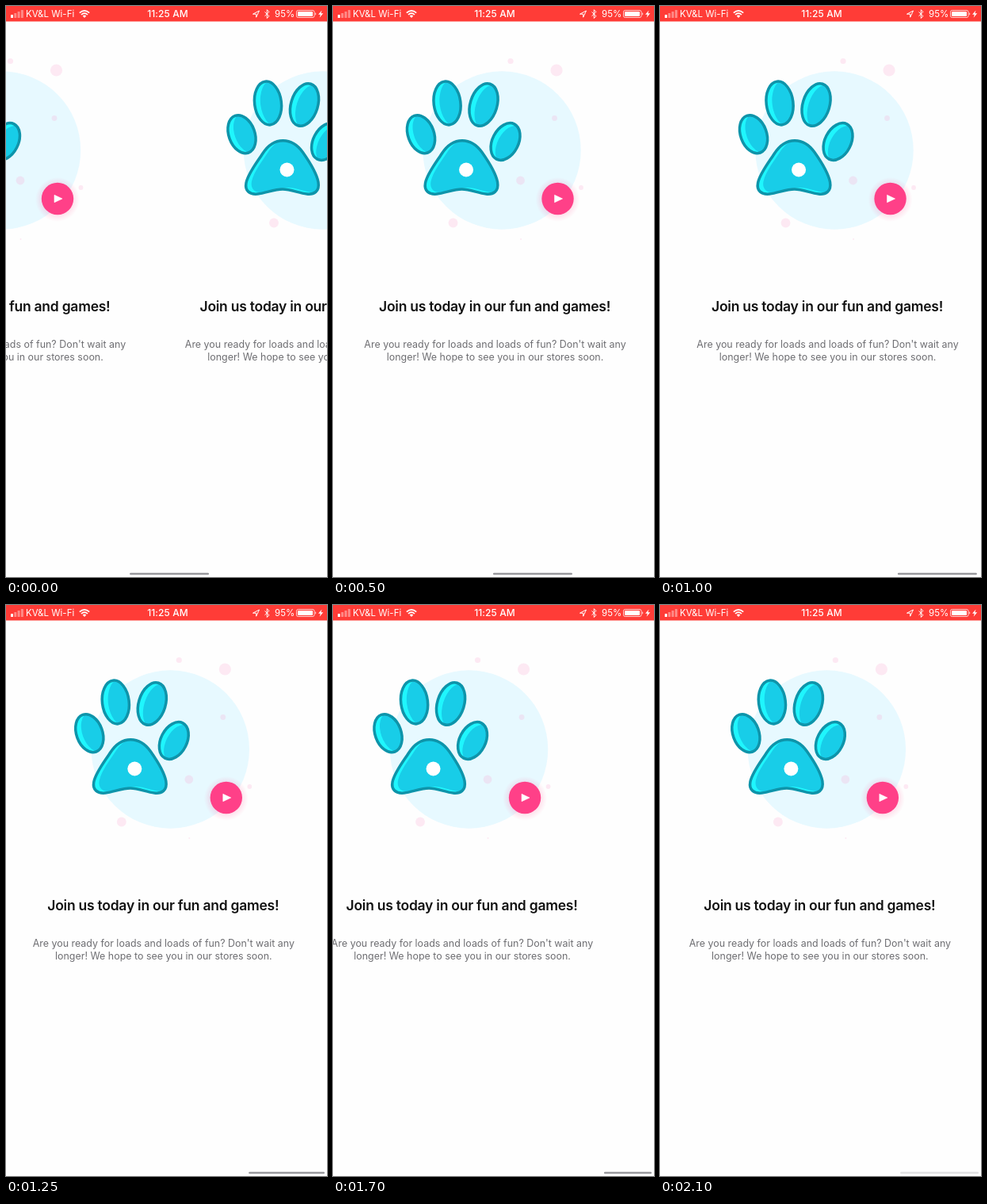
Animation, 405 px wide and 720 px high, one loop 2150 ms. Source, as an HTML page:

```html
<!DOCTYPE html>
<html lang="en">
<head>
<meta charset="utf-8">
<title>Onboarding pager</title>
<style>
  html, body { margin: 0; width: 100%; height: 100%; overflow: hidden; background: #fefefe; }
  svg { display: block; width: 405px; height: 720px; }
  text { font-family: Inter, Roboto, "Liberation Sans", sans-serif; }
  .title { font-size: 17.5px; font-weight: 600; letter-spacing: -.25px; fill: #111; text-anchor: middle; }
  .copy { font-size: 12.45px; fill: #6e6e72; text-anchor: middle; }
  .status { font-size: 11.5px; fill: #fff; }
  .clock { font-size: 12px; font-weight: 500; letter-spacing: .1px; text-anchor: middle; }
  .outline { fill: none; stroke: #0e94aa; stroke-width: 3.5; }
  .shine { fill: #1ff6fd; }
  .skin { fill: #18cde8; }
  .dots { fill: #f9a8cf; fill-opacity: .24; }
</style>
</head>
<body>
<svg viewBox="0 0 405 720">
  <defs>
    <radialGradient id="glow">
      <stop offset=".68" stop-color="#ff4088" stop-opacity=".16"/>
      <stop offset="1" stop-color="#ff4088" stop-opacity="0"/>
    </radialGradient>
    <ellipse id="toe0" rx="16.4" ry="24.8"/>
    <ellipse id="toe1" rx="16.9" ry="27.500"/>
    <path id="pad" d="M161 169.700C172 169.700 180 176 186 184.500C192 193 203 209 205.500 222C207.500 234 200 238 191 237C181 236 171 231 160.500 231C150 231 139 236 129 237C119 238 112.500 233 114.500 223C117 211 129 196 135 186.500C141 177 150 169.700 161 169.700Z"/>
    <clipPath id="clip0"><use href="#toe0"/></clipPath>
    <clipPath id="clip1"><use href="#toe1"/></clipPath>
    <clipPath id="clipPad"><use href="#pad"/></clipPath>
    <g id="small">
      <use href="#toe0" class="shine"/>
      <g clip-path="url(#clip0)"><ellipse class="skin" cx="7" cy="1" rx="16" ry="26"/></g>
      <use href="#toe0" class="outline"/>
    </g>
    <g id="large">
      <use href="#toe1" class="shine"/>
      <g clip-path="url(#clip1)"><ellipse class="skin" cx="7" cy="1" rx="16.5" ry="29"/></g>
      <use href="#toe1" class="outline"/>
    </g>

    <g id="art">
      <circle cx="211" cy="182" r="99.700" fill="#e7f9ff"/>
      <g class="dots">
        <circle cx="222" cy="69.500" r="3.600"/>
        <circle cx="280" cy="81" r="7.600"/>
        <circle cx="277.500" cy="141.500" r="3.400"/>
        <circle cx="234.500" cy="220" r="5.400"/>
        <circle cx="311" cy="229" r="2.900"/>
        <circle cx="149.500" cy="273.500" r="5.900"/>
        <circle cx="235" cy="294" r="1"/>
      </g>
      <use href="#small" transform="translate(109 161.700) rotate(-20)"/>
      <use href="#large" transform="translate(142 122.500) rotate(-7)"/>
      <use href="#large" transform="translate(188 124.500) rotate(17)"/>
      <use href="#small" transform="translate(215.500 171) rotate(27)"/>
      <use href="#pad" class="shine"/>
      <g clip-path="url(#clipPad)"><use href="#pad" class="skin" x="7" y="-2"/></g>
      <use href="#pad" class="outline"/>
      <circle cx="166" cy="206.500" r="9" fill="#fff"/>
      <circle cx="281.500" cy="244" r="28" fill="url(#glow)"/>
      <circle cx="281.500" cy="243" r="20.200" fill="#ff4088"/>
      <path d="M277.500 238.300V247.700L287.500 243Z" fill="#fff" stroke="#fff" stroke-width=".6" stroke-linejoin="round"/>
    </g>
    <g id="page">
      <use href="#art" x=".5"/>
      <text class="title" x="202.500" y="385">Join us today in our fun and games!</text>
      <text class="copy" x="203" y="431.300">Are you ready for loads and loads of fun? Don't wait any</text>
      <text class="copy" x="203" y="446.800">longer! We hope to see you in our stores soon.</text>
    </g>
  </defs>

  <rect width="405" height="720" fill="#fefefe"/>
  <g id="strip">
    <use href="#page"/>
    <use href="#page" x="405"/>
    <use href="#page" x="810"/>
    <use href="#page" x="1215"/>
  </g>
  <rect id="thumb" y="714.700" height="2.500" rx="1.250" fill="#98989c"/>

  <rect width="405" height="19.500" fill="#ff3c37"/>
  <g fill="#fff">
    <rect x="6" y="11" width="3" height="4" rx=".6"/>
    <g opacity=".4">
      <rect x="10.300" y="9" width="3" height="6" rx=".6"/>
      <rect x="14.600" y="7" width="3" height="8" rx=".6"/>
      <rect x="18.900" y="5" width="3" height="10" rx=".6"/>
    </g>
    <path d="M99 15L96.700 12.500Q99 10.700 101.300 12.500Z"/>
    <rect x="366.500" y="5.500" width="22.500" height="9" rx="2" fill="none" stroke="#fff" stroke-opacity=".75"/>
    <rect x="368" y="7" width="19" height="6" rx=".8"/>
    <path d="M390.300 8.300Q392.200 10 390.300 11.700Z"/>
    <path d="M398.500 5.500L394 10.700H396.800L395.600 14.800L400.200 9.300H397.300Z"/>
  </g>
  <g fill="none" stroke="#fff">
    <path d="M92.800 8.700Q99 3 105.200 8.700M94.900 11Q99 7.300 103.100 11" stroke-width="1.600"/>
    <path d="M311.500 10.200L319.500 6L315.700 14.200V10.200Z" stroke-linejoin="round"/>
    <path d="M326.500 7.500L332 12.700L329.300 15.500V4.700L332 7.400L326.500 12.700"/>
  </g>
  <text class="status" x="25" y="14.200">KV&amp;L Wi-Fi</text>
  <text class="status clock" x="204" y="14.200">11:25 AM</text>
  <text class="status" x="339" y="14.200">95%</text>
</svg>
<script>
  const LOOP = 2150, STEP = 50, PAGE = 405, END = PAGE * 3;
  const strip = document.getElementById("strip");
  const thumb = document.getElementById("thumb");

  // Distance dragged from the start of a swipe to its release.
  const drag = (t, start, end, dist, power) => dist * ((t - start) / (end - start)) ** power;
  // Distance still to go while a page snaps into place.
  const settle = (t, left, tau) => left * Math.exp(-t / tau);

  function scrollAt(t) {
    if (t < 530) return PAGE * 2 - settle(t, 188, 104);
    if (t < 700) return PAGE * 2 + drag(t, 530, 700, 190, 2);
    if (t < 1230) return END - settle(t - 700, 215, 93);
    if (t < 1450) return END + drag(t, 1230, 1450, 120, 1.4);
    // The last page springs back with critical damping.
    const s = t - 1450;
    return END + (120 + 2.02 * s) * Math.exp(-0.011 * s);
  }

  function draw(t) {
    const x = scrollAt(t);
    const over = Math.max(0, x - END);
    const width = Math.max(7, 100 - over);
    const left = over ? 402 - width : 3 + x / END * 299;
    strip.setAttribute("transform", `translate(${-x} 0)`);
    thumb.setAttribute("x", left);
    thumb.setAttribute("width", width);
    thumb.setAttribute("opacity", 1 - Math.min(1, Math.max(0, (t - 2000) / 140)));
  }

  const begin = performance.now();
  function tick() {
    const t = (performance.now() - begin) % LOOP;
    draw(Math.floor(t / STEP) * STEP);
    requestAnimationFrame(tick);
  }
  draw(0);
  requestAnimationFrame(tick);
</script>
</body>
</html>
```
